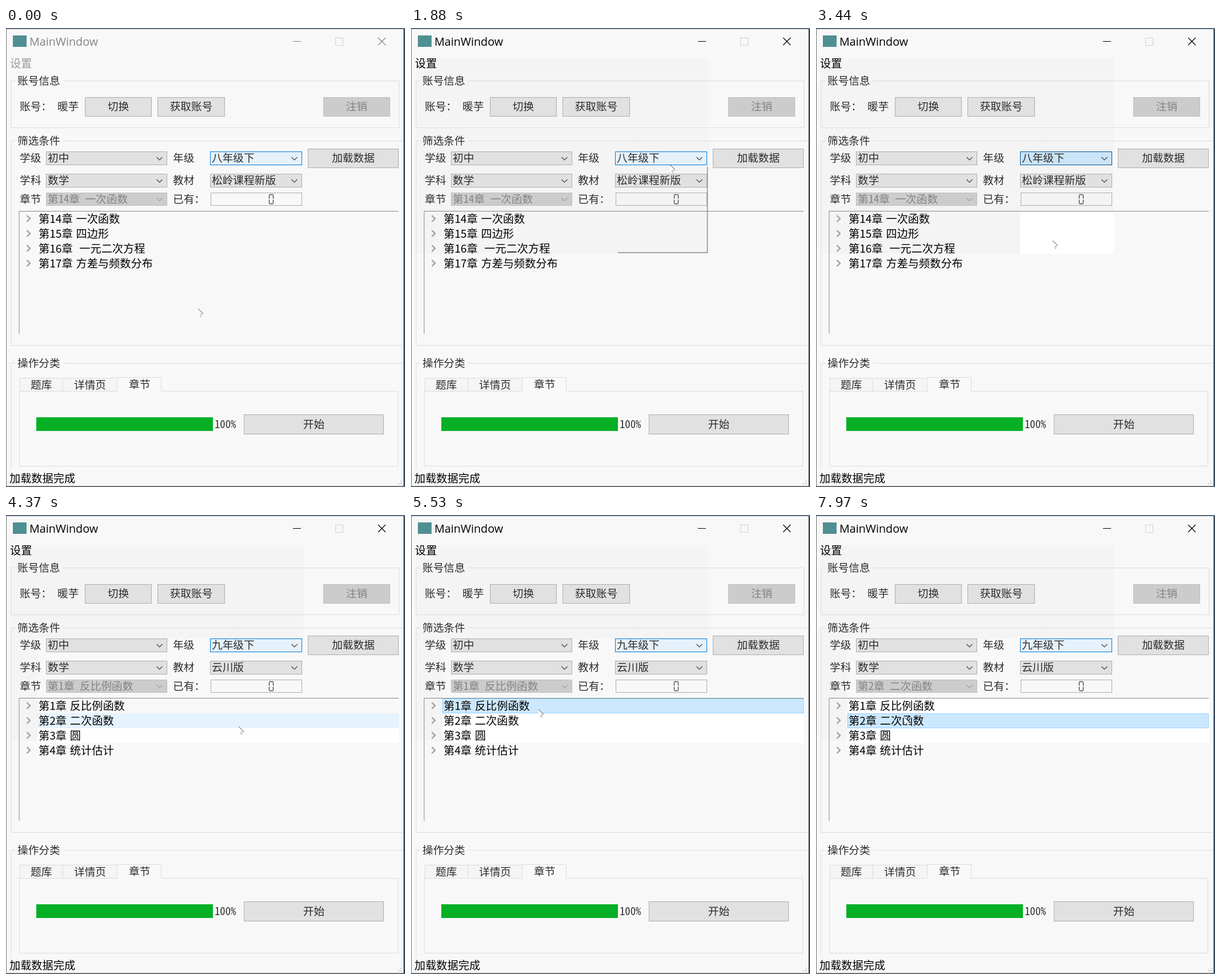
These frames come from a looping animation (698x803 px, 8000 ms). An HTML page with a canvas:

```html
<!DOCTYPE html>
<html lang="zh-CN">
<head>
<meta charset="utf-8">
<title>MainWindow</title>
<style>
html, body { margin: 0; width: 100%; height: 100%; overflow: hidden; background: #f8f8f8; }
canvas { display: block; }
</style>
</head>
<body>
<canvas id="stage" width="698" height="803"></canvas>
<script>
const ctx = document.getElementById('stage').getContext('2d');
const LOOP = 8000;
const BG = '#f8f8f8', LINE = '#dcdcdc', INK = '#2c2c2c', ROW_TOP = 321, ROW_H = 26;
const FORM = '300 18.7px "Noto Sans Mono CJK SC", "Noto Sans CJK SC", "Noto Sans CJK", sans-serif';
const VIEW = '400 19.2px "Noto Sans CJK SC", "Noto Sans CJK", sans-serif';
const TITLE = '400 19.7px "Open Sans", sans-serif';

const GRADES = ['七年级上', '七年级下', '八年级上', '八年级下', '九年级上', '九年级下'];
const BEFORE = ['第14章 一次函数', '第15章 四边形', '第16章  一元二次方程', '第17章 方差与频数分布'];
const AFTER = ['第1章 反比例函数', '第2章 二次函数', '第3章 圆', '第4章 统计估计'];

// Pointer tip: time, x, y
const POINTER = [
  [0, 336, 491], [650, 452, 228], [850, 474, 220], [970, 486, 212], [1100, 468, 225], [1220, 453, 239],
  [2330, 440, 338], [2480, 426, 353], [2600, 414, 372],
  [4370, 407, 370], [4490, 396, 363], [4610, 378, 356], [4760, 328, 344], [4880, 262, 342], [5000, 223, 340],
  [6770, 212, 352], [6890, 204, 360], [7970, 155, 354]
];
// Tree state: time, hovered row, selected row
const TREE = [[0, -1, -1], [3690, 2, -1], [4370, 1, -1], [4760, 0, -1], [5530, 0, 0], [6770, 1, 0], [7320, 1, 1]];

const latest = (keys, t) => keys.filter(k => k[0] <= t).pop();

function fill(x, y, w, h, color) {
  ctx.fillStyle = color;
  ctx.fillRect(x, y, w, h);
}

function box(x1, y1, x2, y2, color, border) {
  if (color) fill(x1, y1, x2 - x1, y2 - y1, color);
  ctx.strokeStyle = border;
  ctx.lineWidth = 1;
  ctx.strokeRect(x1 + .5, y1 + .5, x2 - x1 - 1, y2 - y1 - 1);
}

function path(points, color, width = 1) {
  ctx.beginPath();
  points.forEach(([x, y]) => ctx.lineTo(x, y));
  ctx.strokeStyle = color;
  ctx.lineWidth = width;
  ctx.stroke();
}

function text(str, x, middle, font = FORM, color = font === FORM ? INK : '#000', align = 'left') {
  ctx.font = font;
  ctx.fillStyle = color;
  ctx.textAlign = align;
  ctx.wordSpacing = font === VIEW ? '1.5px' : '0px';
  ctx.fillText(str, x, Math.round(middle) + (font === FORM ? 6 : 7));
}

function button(label, x1, y1, x2, y2, disabled) {
  box(x1, y1, x2, y2, disabled ? '#cccccc' : '#e1e1e1', disabled ? '#bfbfbf' : '#adadad');
  text(label, (x1 + x2) / 2, (y1 + y2) / 2, FORM, disabled ? '#838383' : INK, 'center');
}

function combo(label, x1, y1, x2, y2, color = '#e1e1e1', border = '#adadad', ink = INK) {
  const middle = (y1 + y2) / 2, cx = x2 - 13.5;
  box(x1, y1, x2, y2, color, border);
  text(label, x1 + 3, middle, FORM, ink);
  path([[cx - 5, middle - 2], [cx, middle + 3], [cx + 5, middle - 2]], ink === INK ? '#444' : '#a0a0a0', 1.2);
}

function group(title, y, right, bottom) {
  path([[16, y + .5], [9, y + .5], [9, bottom + .5]], LINE);
  path([[100, y + .5], [right, y + .5]], LINE);
  text(title, 20, y + 1);
}

// Seven-segment digit
function digit(n, x, y) {
  const lines = {
    a: [0, 0, 7, 0], g: [0, 8, 7, 8], d: [0, 16, 7, 16],
    f: [0, 1, 0, 7], b: [7, 1, 7, 7], e: [0, 9, 0, 15], c: [7, 9, 7, 15]
  };
  for (const s of { 0: 'abcdef', 3: 'abcdg' }[n]) {
    const [x1, y1, x2, y2] = lines[s];
    path([[x + x1, y + y1], [x + x2, y + y2]], '#444', 1.4);
  }
}

function drawWindow(active) {
  const ink = active ? '#000' : '#858585';
  fill(0, 0, 698, 2, '#596a7e');
  fill(0, 2, 1, 801, '#6c6c6c');
  fill(695, 2, 1, 801, '#8a8f94');
  fill(696, 2, 2, 801, '#34495c');
  fill(1, 801, 694, 1, '#8a8a8a');
  fill(0, 802, 698, 1, '#555');
  fill(12, 13, 24, 20, '#4f8f92');
  text('MainWindow', 41, 24, TITLE, ink);
  fill(502, 23, 14, 1, ink);
  box(576, 17, 590, 31, null, '#cfcfcf');
  path([[651, 17], [664, 30]], ink, 1.3);
  path([[664, 17], [651, 30]], ink, 1.3);
  text('设置', 7, 62, VIEW, active ? '#000' : '#999');
}

function drawAccount() {
  group('账号信息', 92, 688, 174);
  path([[687.5, 92], [687.5, 174.5], [9, 174.5]], LINE);
  text('账号：', 24, 138);
  text('暖芋', 90, 138);
  button('切换', 138, 121, 255, 155);
  button('获取账号', 265, 121, 383, 155);
  button('注销', 555, 121, 672, 155, true);
}

function drawFilters(t) {
  const loaded = t >= 3690, open = t >= 2070 && t < 3690;
  group('筛选条件', 197, 695, 555);
  path([[9, 555.5], [695, 555.5]], LINE);
  [['学级', 228], ['学科', 267], ['章节', 300]].forEach(([s, y]) => text(s, 24, y));
  [['年级', 228], ['教材', 267], ['已有：', 300]].forEach(([s, y]) => text(s, 292, y));
  const chapter = !loaded ? BEFORE[0] : t < 7600 ? AFTER[0] : AFTER[1];
  combo('初中', 70, 216, 282, 240);
  combo('数学', 70, 255, 282, 279);
  combo(chapter, 70, 288, 282, 311, '#cccccc', '#bfbfbf', '#838383');
  combo(GRADES[loaded ? 5 : 3], 357, 216, 518, 240, open ? '#cce4f7' : '#e5f1fb', open ? '#005499' : '#0078d7');
  combo(loaded ? '云川版' : '松岭课程新版', 357, 255, 518, 279);
  button('加载数据', 528, 211, 687, 245);
  box(358, 288, 518, 311, null, '#adadad');
  if (t >= 5780 && t < 7600) digit(3, 449.5, 291.5);
  digit(0, 460.5, 291.5);
}

function drawTree(t) {
  const [, hover, selected] = latest(TREE, t);
  const loaded = t >= 3690;
  const visited = t < 4370 ? 3 : t < 4760 ? 2 : t < 7320 ? 1 : 0;
  (loaded ? AFTER : BEFORE).forEach((label, i) => {
    const y = ROW_TOP + i * ROW_H, middle = y + 13;
    if (loaded && i >= visited && i < 3) fill(55, y, 632, ROW_H, '#fff');
    if (i === selected) {
      fill(55, y, 632, ROW_H, '#cce8ff');
      if (i === hover) box(55, y, 687, y + ROW_H, null, '#99d1ff');
    } else if (i === hover) fill(55, y, 632, ROW_H, '#e5f3ff');
    path([[36.5, middle - 6], [42, middle - .5], [36.5, middle + 5]], '#a0a0a0', 2.4);
    text(label, 57, middle, VIEW);
  });
  path([[687, 320.5], [23, 320.5], [23, 535]], '#828790');
}

function drawOperations() {
  group('操作分类', 586, 695, 772);
  box(23, 635, 686, 767, null, LINE);
  box(24, 612, 100, 636, '#f5f5f5', LINE);
  box(99, 612, 195, 636, '#f5f5f5', LINE);
  fill(194, 611, 78, 25, '#f9f9f9');
  path([[194.5, 636], [194.5, 611.5], [271.5, 611.5], [271.5, 636]], LINE);
  text('题库', 43, 625);
  text('详情页', 119, 625);
  text('章节', 215, 624);
  fill(53, 681, 309, 24, '#06b025');
  text('100%', 365, 694);
  button('开始', 416, 676, 661, 711);
  text('加载数据完成', 6, 788, VIEW);
  for (let row = 0; row < 3; row++)
    for (let col = row ? 0 : 1; col < 2; col++) fill(686 + col * 4, 792 + row * 4, 2, 2, '#c4c4c4');
}

// Patches of slightly different tone left behind by the popup
function drawTones(t) {
  if (t < 1880) return;
  fill(8, 53, 513, 342, '#f4f4f4');
  if (t >= 3690) fill(55, 216, 632, 206, BG);
  else if (t >= 3440) fill(357, 321, 164, 74, '#fff');
}

function drawPopup(t, tipY) {
  if (t < 1880 || t >= 3440) return;
  path([[518.5, 243], [518.5, 393], [362, 393]], '#8c8c8c', 1.4);
  if (t < 2070) return;
  box(357, 240, 518, 392, '#fff', '#646464');
  const current = t < 2330 ? 3 : Math.floor((tipY - 241) / 25);
  GRADES.forEach((label, i) => {
    const y = 241 + i * 25;
    if (i === current) fill(358, y, 159, 25, '#0078d7');
    text(label, 361, y + 12.5, FORM, i === current ? '#fff' : INK);
  });
}

function drawPointer(x, y) {
  ctx.beginPath();
  [[0, 0], [0, 12], [3, 10], [6, 15], [8, 14], [6, 9], [9, 9]].forEach(([dx, dy]) => ctx.lineTo(x + dx, y + dy));
  ctx.fillStyle = '#fff';
  ctx.fill();
  path([[x, y], [x + 9, y + 9]], '#333', .9);
  path([[x + 8, y + 9.5], [x + 4, y + 9.5], [x + 6.5, y + 13], [x + 5, y + 14.5], [x + 3, y + 11]], '#888', .7);
}

function draw(t) {
  const [, x, y] = latest(POINTER, t);
  fill(0, 0, 698, 803, BG);
  drawTones(t);
  drawWindow(t >= 1630);
  drawAccount();
  drawFilters(t);
  drawTree(t);
  drawOperations();
  drawPopup(t, y);
  drawPointer(x, y);
}

const start = performance.now();
function tick() {
  draw((performance.now() - start) % LOOP);
  requestAnimationFrame(tick);
}
tick();
</script>
</body>
</html>
```
